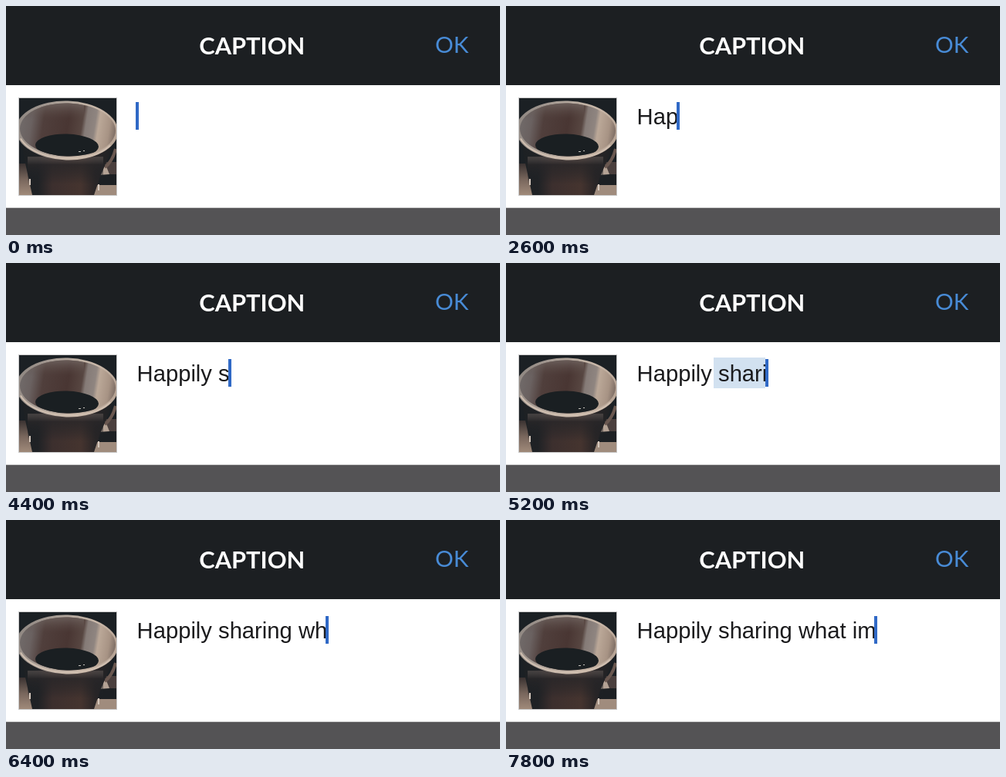
These frames come from a looping animation (640x298 px, 8 s). An HTML page with a canvas:

```html
<!DOCTYPE html>
<html lang="en">
<head>
<meta charset="utf-8">
<title>Caption</title>
<style>
  html, body { margin: 0; width: 100%; height: 100%; overflow: hidden; background: #fff; }
  canvas { display: block; }
</style>
</head>
<body>
<canvas id="stage" width="640" height="298"></canvas>
<script>
const ctx = document.getElementById('stage').getContext('2d');
const LOOP = 8000;
const TEXT = 'Happily sharing what im';
// Time at which each character appears.
const KEYS = [
  2200, 2400, 2600, 2800, 3000, 3200, 3400, 4000,
  4400, 4600, 4800, 5000, 5200, 5400, 5600, 5800,
  6000, 6400, 6600, 6800, 7200, 7600, 7800
];
const TEXT_X = 169.6;
const TEXT_FONT = '29.2px "Liberation Sans", Arial, sans-serif';

function rect(color, x, y, w, h) {
  ctx.fillStyle = color;
  ctx.fillRect(x, y, w, h);
}

function poly(color, ...pts) {
  ctx.fillStyle = color;
  ctx.beginPath();
  for (let i = 0; i < pts.length; i += 2) ctx.lineTo(pts[i], pts[i + 1]);
  ctx.fill();
}

function oval(color, x, y, rx, ry, turn = 0) {
  ctx.fillStyle = color;
  ctx.beginPath();
  ctx.ellipse(x, y, rx, ry, turn, 0, Math.PI * 2);
  ctx.fill();
}

function blend(x0, y0, x1, y1, ...stops) {
  const g = ctx.createLinearGradient(x0, y0, x1, y1);
  for (let i = 0; i < stops.length; i += 2) g.addColorStop(stops[i], stops[i + 1]);
  return g;
}

function label(str, x, y, font, color, align = 'left') {
  ctx.font = font;
  ctx.fillStyle = color;
  ctx.textAlign = align;
  ctx.fillText(str, x, y);
}

function drawHeader() {
  rect('#1c1f22', 0, 0, 640, 103);
  label('CAPTION', 318.8, 62.5, 'bold 30.8px Lato, "Open Sans", sans-serif', '#fff', 'center');
  label('OK', 556, 60.6, '29.6px Lato, "Open Sans", sans-serif', '#488bd6');
}

function drawCup() {
  rect('#c9c9c9', 16, 119, 128, 128);
  ctx.save();
  ctx.beginPath();
  ctx.rect(17, 120, 126, 126);
  ctx.clip();

  // Backdrop and table
  rect('#1b2024', 17, 120, 126, 126);
  rect(blend(0, 205, 0, 246, 0, '#3a3231', 0.5, '#78665c', 1, '#a08a7a'), 17, 205, 20, 41);
  rect('#4b403e', 118, 203, 25, 16);
  rect('#1d2023', 118, 219, 25, 14);
  rect('#a08c7d', 112, 233, 31, 13);
  poly('#b4a294', 120, 220, 128, 204, 134, 219);

  // Handle
  ctx.strokeStyle = '#6a5850';
  ctx.lineWidth = 4;
  ctx.beginPath();
  ctx.moveTo(142, 186);
  ctx.quadraticCurveTo(138, 202, 128, 210);
  ctx.stroke();

  // Body
  poly(blend(17, 0, 140, 0, 0, '#1c2023', 0.2, '#202225', 0.35, '#3c2f2e',
    0.65, '#45342f', 0.8, '#2a2627', 1, '#1d2023'),
    17, 160, 143, 160, 134, 194, 122, 222, 114, 246, 34, 246, 24, 200);
  rect(blend(0, 198, 0, 232, 0, 'rgba(85,78,76,.65)', 0.25, 'rgba(40,38,40,.8)',
    1, 'rgba(28,32,36,0)'), 28, 196, 98, 36);

  // Rim, inner wall and coffee
  oval(blend(17, 135, 143, 190, 0, '#8d8580', 0.4, '#b3a79d', 0.65, '#c9b8a9', 1, '#b3a091'),
    79, 162, 66, 38.5, 0.03);
  ctx.save();
  ctx.beginPath();
  ctx.ellipse(80, 161, 62, 34.5, 0.03, 0, Math.PI * 2);
  ctx.clip();
  rect(blend(17, 146, 143, 166, 0, '#716b6a', 0.13, '#6a6160', 0.25, '#503f3c', 0.5, '#493633',
    0.64, '#574641', 0.68, '#857b77', 0.77, '#8f8580', 0.81, '#bba898', 0.92, '#a79384',
    1, '#776860'), 17, 120, 126, 80);
  rect(blend(0, 127, 0, 147, 0, 'rgba(120,110,106,.65)', 1, 'rgba(90,75,70,0)'), 17, 120, 84, 30);
  oval('#1a1f22', 79, 182, 41, 15.5, 0.03);
  rect('#c6c3bd', 94, 189, 3, 1);
  rect('#c6c3bd', 100, 188, 2, 1);
  ctx.restore();

  // Highlights
  ctx.lineWidth = 2;
  ctx.strokeStyle = '#d0bfb0';
  ctx.beginPath();
  ctx.ellipse(79.5, 162, 64, 36.5, 0.03, 0.5, 2.8);
  ctx.stroke();
  rect('#d5c8bd', 30, 225, 2, 8);
  rect('#d5c8bd', 119, 232, 2, 8);
  ctx.restore();
}

function drawField(t) {
  const count = KEYS.filter(k => k <= t).length;
  const typed = TEXT.slice(0, count);
  if (t >= 5200 && t < 5400) rect('#d2e1f0', 269, 123, 67, 40);
  label(typed, TEXT_X, 154, TEXT_FONT, '#1b1b1d');

  const x = Math.floor(TEXT_X + ctx.measureText(typed).width - 1.5);
  const phase = t % 1000;
  let color = '#3069c6';
  if (!count && phase >= 500 && phase < 700) color = '#a9b1b3';
  if (!count && phase >= 700 && phase < 900) return;
  rect(color, x, 125, 4, 36);
}

function draw(now) {
  const t = now % LOOP;
  rect('#fff', 0, 0, 640, 298);
  drawHeader();
  drawCup();
  drawField(t);
  rect('#c8c8c8', 0, 262, 640, 1);
  rect('#545355', 0, 263, 640, 35);
}

let start = null;
function tick(now) {
  if (start === null) start = now;
  draw(now - start);
  requestAnimationFrame(tick);
}

ctx.fontKerning = 'none';
draw(0);
requestAnimationFrame(tick);
</script>
</body>
</html>
```
